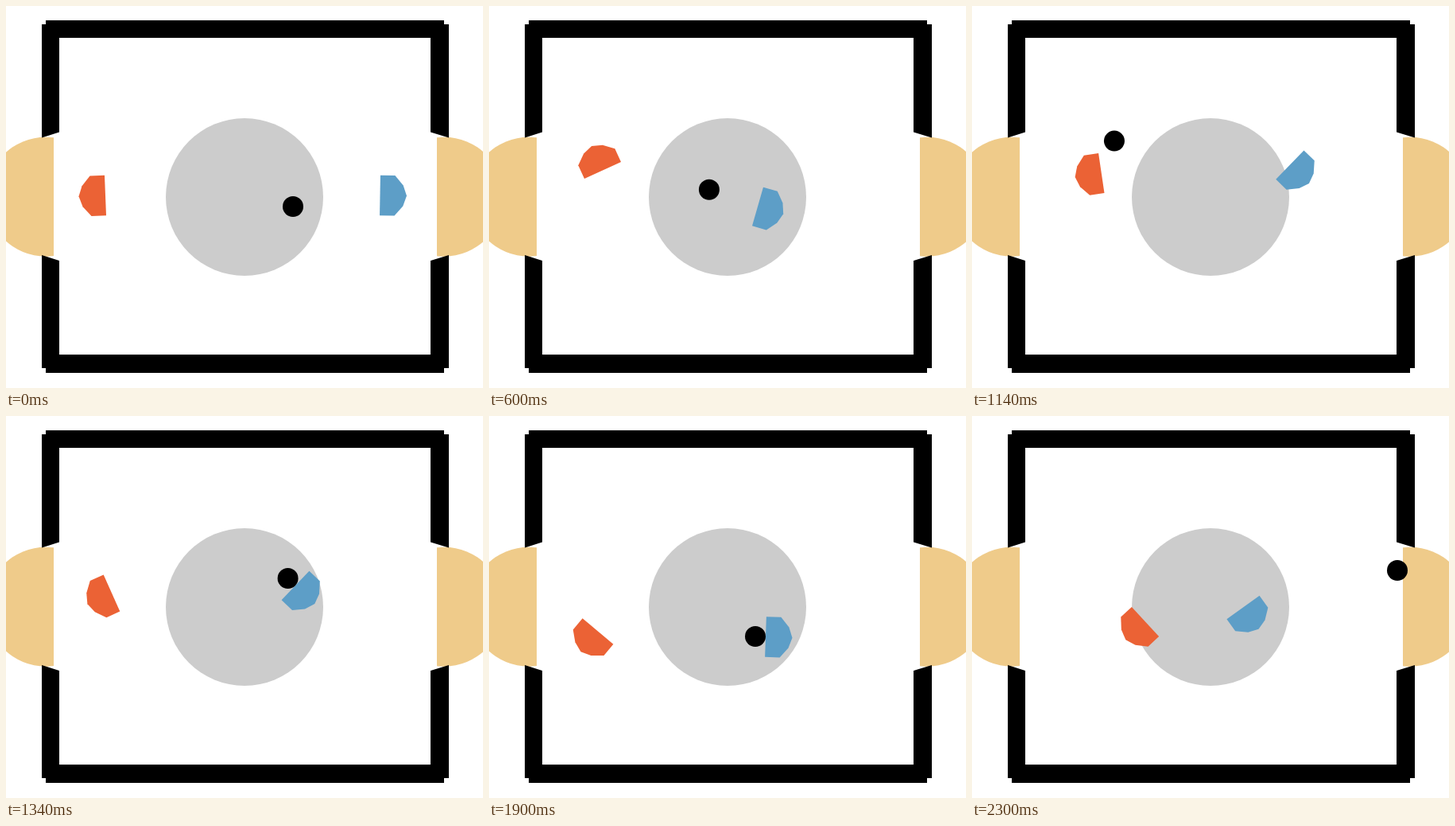
Recreate the animation shown at these times as an HTML page with a canvas. Size 600 by 480 pixels, loop 2320 ms.

```html
<!DOCTYPE html>
<html lang="en">
<head>
<meta charset="utf-8">
<title>Table hockey</title>
<style>
  html, body { margin: 0; width: 100%; height: 100%; overflow: hidden; background: #fff; }
  canvas { display: block; }
</style>
</head>
<body>
<canvas id="stage" width="600" height="480"></canvas>
<script>
const ctx = document.getElementById('stage').getContext('2d');
const LOOP = 2320, STEP = 20, PUCK_RADIUS = 13, PUCK_START = [361, 252], FIRST_CATCH = 300;

// Turning points of each racket: time, middle of the flat side, heading in degrees
const red = [
  [0, 125, 238, 177.7], [280, 96, 236, 190], [600, 143, 206.5, 245.5],
  [960, 179, 207, 199], [1340, 133, 222.5, 156], [1600, 98.5, 280.5, 221.7],
  [1690, 117, 324, 190], [1900, 137, 270.5, 130], [2300, 218, 258.5, 137.4]
];
const blue = [
  [0, 470.5, 238, 1], [300, 375, 250, 6], [600, 338, 252, 16],
  [960, 332, 204.5, 44], [1160, 403, 200, 44], [1340, 364, 213, 43.5],
  [1600, 325, 290.5, -14], [1900, 348, 277.5, 2], [2300, 341, 240.5, 54.4]
];
// Shots from the blue racket, with their bounces; each returns to it or ends in the goal
const shots = [
  { from: 555, to: 820, bounces: [[166, 187]] },
  { from: 918, to: 1300, bounces: [[218, 55], [172, 190]] },
  { from: 1555, to: 1880, bounces: [[142, 348]] },
  { from: 1905, to: 2300, bounces: [[184, 262], [529, 171]], end: [535, 194] }
];

const mix = (p, q, u) => p.map((v, i) => v + (q[i] - v) * u);

// Smooth pose through the turning points (cubic Hermite)
function pose(keys, t) {
  const next = Math.max(1, keys.findIndex(k => k[0] >= t));
  const a = keys[next - 1], b = keys[next], span = b[0] - a[0], u = (t - a[0]) / span;
  const slope = (k, c) => {
    const p = keys[Math.max(k - 1, 0)], n = keys[Math.min(k + 1, keys.length - 1)];
    return (n[c] - p[c]) / (n[0] - p[0]) * span;
  };
  return [1, 2, 3].map(c =>
    a[c] + (b[c] - a[c]) * u * u * (3 - 2 * u) +
    slope(next - 1, c) * u * (1 - u) ** 2 - slope(next, c) * u * u * (1 - u));
}

function held(t) {
  const [x, y, deg] = pose(blue, t), angle = deg * Math.PI / 180;
  return [x - PUCK_RADIUS * Math.cos(angle), y - PUCK_RADIUS * Math.sin(angle)];
}

// Point at a share of the path's length
function along(path, share) {
  const lengths = path.slice(1).map((p, i) => Math.hypot(p[0] - path[i][0], p[1] - path[i][1]));
  let rest = share * lengths.reduce((sum, l) => sum + l), i = 0;
  while (i < lengths.length - 1 && rest > lengths[i]) rest -= lengths[i++];
  return mix(path[i], path[i + 1], rest / lengths[i]);
}

function puckAt(t) {
  if (t < FIRST_CATCH) return PUCK_START;
  const shot = shots.find(s => t >= s.from && t <= s.to);
  if (!shot) return held(t);
  const { from, to, bounces, end = held(to) } = shot;
  return along([held(from), ...bounces, end], (t - from) / (to - from));
}

function polygon(points, color) {
  ctx.fillStyle = color;
  ctx.beginPath();
  points.forEach(p => ctx.lineTo(...p));
  ctx.fill();
}

function disc(x, y, r, color) {
  ctx.fillStyle = color;
  ctx.beginPath();
  ctx.arc(x, y, r, 0, 2 * Math.PI);
  ctx.fill();
}

function goal(x, left, width) {
  ctx.save();
  ctx.beginPath();
  ctx.rect(left, 0, width, 480);
  ctx.clip();
  disc(x, 239.7, 75, '#efcb8a');
  ctx.restore();
}

function rink() {
  ctx.fillStyle = '#fff';
  ctx.fillRect(0, 0, 600, 480);
  disc(300, 240, 99, '#ccc');
  goal(50, 0, 60);
  goal(551, 542, 58);
  ctx.fillStyle = '#000';
  ctx.fillRect(50, 18, 501, 22);
  ctx.fillRect(50, 438, 501, 23);
  for (const [outer, inner] of [[45, 67], [557, 534]]) {
    polygon([[outer, 23], [inner, 23], [inner, 158.5], [outer, 165.5]], '#000');
    polygon([[outer, 455], [inner, 455], [inner, 320], [outer, 313]], '#000');
  }
}

function racket(keys, t, color) {
  const [x, y, deg] = pose(keys, t);
  const half = [[0, 25.3], [18.5, 25.3], [29, 13], [33.5, 0]];
  const mirrored = half.map(([px, py]) => [px, -py]).reverse();
  ctx.save();
  ctx.translate(x, y);
  ctx.rotate(deg * Math.PI / 180);
  polygon([...half, ...mirrored], color);
  ctx.restore();
}

function draw() {
  const t = Math.floor(performance.now() % LOOP / STEP) * STEP;
  rink();
  racket(red, t, '#eb6235');
  racket(blue, t, '#5d9ec7');
  disc(...puckAt(t), PUCK_RADIUS, '#000');
  requestAnimationFrame(draw);
}

draw();
</script>
</body>
</html>
```
